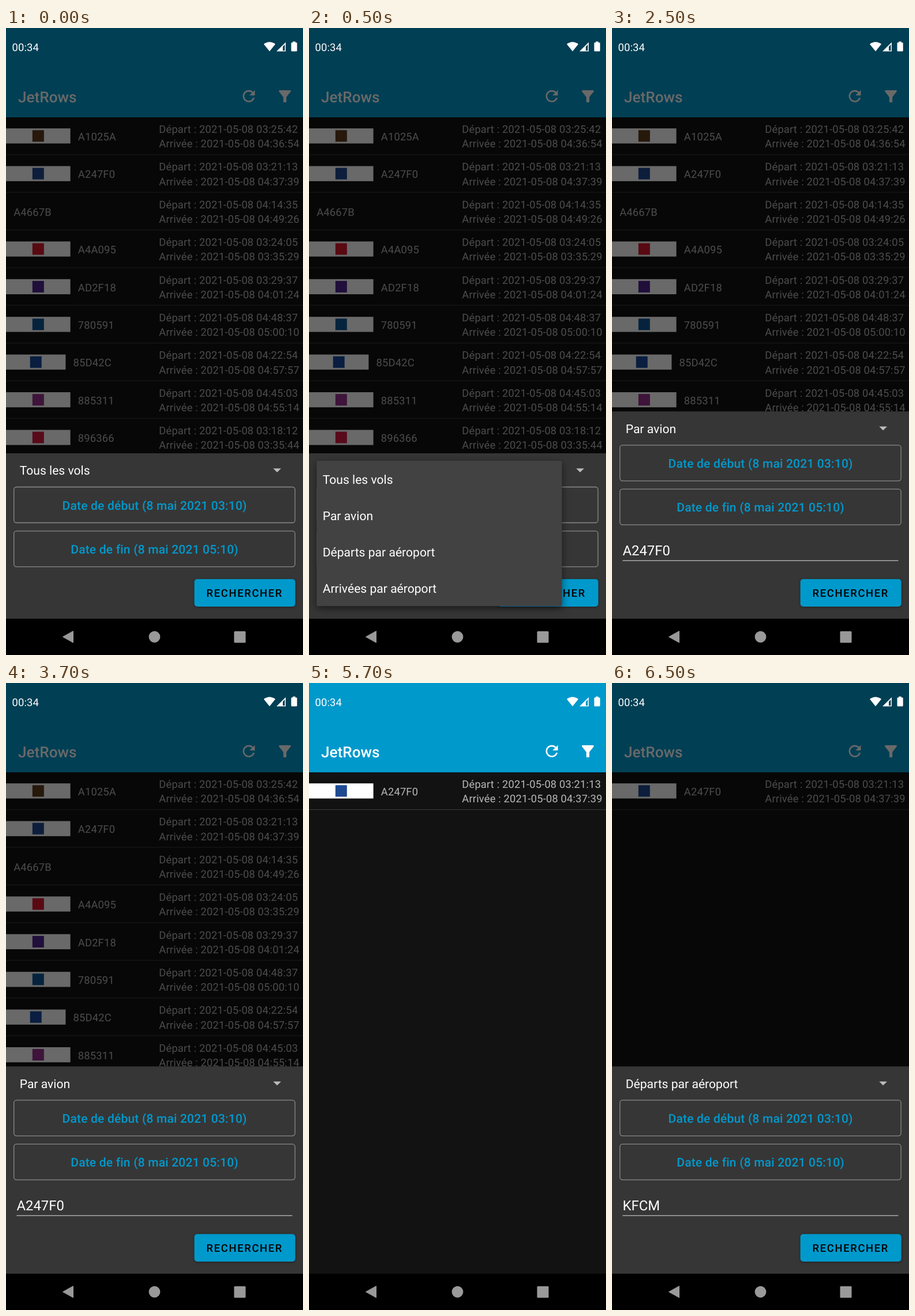
Write an HTML page that moves like this. It is 515 by 1088 pixels and loops after 8000 ms.

```html
<!DOCTYPE html>
<html lang="fr">
<head>
<meta charset="utf-8">
<title>Liste des vols</title>
<style>
html, body { margin: 0; width: 100%; height: 100%; overflow: hidden; background: #000; }
svg { display: block; width: 515px; height: 1088px; }
text { font: 18.36px Roboto, sans-serif; fill: #fff; text-rendering: geometricPrecision; white-space: pre; }
.row text { fill: #b8b8b8; letter-spacing: .16px; }
.clock { letter-spacing: .2px; }
.title { font-size: 26.2px; font-weight: 500; }
.item { font-size: 21.1px; }
.date { font-size: 20.98px; font-weight: 500; letter-spacing: .2px; fill: #0099cc; text-anchor: middle; }
.input { font-size: 23.85px; }
.search { font-weight: 500; letter-spacing: 1.68px; fill: #000; }
.box { fill: none; stroke: #8a8a8a; stroke-width: 1.3; }
</style>
</head>
<body>
<svg id="stage" viewBox="0 0 515 1088"></svg>
<script>
const stage = document.getElementById('stage');

// code, departure, arrival, badge colour, plate width
const flights = [
  ['A1025A', '03:25:42', '04:36:54', '#5d3b1c', 111.6],
  ['A247F0', '03:21:13', '04:37:39', '#1f4a92', 111.6],
  ['A4667B', '04:14:35', '04:49:26', '', 0],
  ['A4A095', '03:24:05', '03:35:29', '#d8162c', 111.6],
  ['AD2F18', '03:29:37', '04:01:24', '#4d2290', 111.6],
  ['780591', '04:48:37', '05:00:10', '#0d5694', 111.6],
  ['85D42C', '04:22:54', '04:57:57', '#17489c', 103.4],
  ['885311', '04:45:03', '04:55:14', '#96308e', 111.6],
  ['896366', '03:18:12', '03:35:44', '#d8183f', 111.6]
];
const choices = ['Tous les vols', 'Par avion', 'Départs par aéroport', 'Arrivées par aéroport'];

const text = (x, y, str, cls = '') => `<text x="${x}" y="${y}" class="${cls}">${str}</text>`;
const rect = (x, y, w, h, fill, more = '') =>
  `<rect x="${x}" y="${y}" width="${w}" height="${h}" fill="${fill}" ${more}/>`;
const path = (d, fill, more = '') => `<path d="${d}" fill="${fill}" ${more}/>`;
const icon = (x, y, d) => path(d, '#fff', `transform="translate(${x} ${y}) scale(1.311)"`);

function row([code, from, to, color, width], i) {
  const plate = width
    ? rect(0, 174.2, width, 26.2, '#fff') + rect(width / 2 - 10, 177.3, 20, 20, color) : '';
  return `<g class="row" transform="translate(0 ${i * 65.4})">${plate}
    ${text(width + 13.2, 195, code)}
    ${text(265.3, 182, `Départ : 2021-05-08 ${from}`)}
    ${text(265.3, 207.3, `Arrivée : 2021-05-08 ${to}`)}
    ${rect(0, 219, 515, 1.3, '#343434')}</g>`;
}

const header = rect(0, 0, 515, 155, '#0099cc') + text(21, 129, 'JetRows', 'title')
  + icon(405.3, 102.6, 'M17.65 6.35C16.2 4.9 14.21 4 12 4c-4.42 0-7.99 3.58-7.99 8s3.57 8 7.99 8c3.73 0 6.84-2.55 7.73-6h-2.08c-.82 2.33-3.04 4-5.65 4-3.31 0-6-2.69-6-6s2.69-6 6-6c1.66 0 3.14.69 4.22 1.78L13 11h7V4z')
  + icon(467.8, 102.8, 'M4.25 5.61C6.27 8.2 10 13 10 13v6c0 .55.45 1 1 1h2c.55 0 1-.45 1-1v-6s3.72-4.8 5.74-7.39C20.25 4.95 19.78 4 18.95 4H5.04c-.83 0-1.3.95-.79 1.61z');

const statusBar = text(10.4, 39.5, '00:34', 'clock')
  + path('M447 28Q457 20.5 467 28L457 40.4z', '#fff')
  + path('M469 40.6L485 24.8V40.6z M480 32.2V39.3H483.5V28.7z', '#fff', 'fill-rule="evenodd"')
  + path('M497.2 25.2V23.6H501.8V25.2H503.4Q504.7 25.2 504.7 26.5V39.3Q504.7 40.6 503.4 40.6H495.8Q494.5 40.6 494.5 39.3V26.5Q494.5 25.2 495.8 25.2z', '#fff');

const navBar = rect(0, 1025, 515, 63, '#000')
  + path('M98.5 1056.5L116.5 1046.5V1066.5z', '#999', 'stroke="#999" stroke-linejoin="round"')
  + '<circle cx="257.5" cy="1056.5" r="9.9" fill="#999"/>'
  + rect(395.5, 1046.7, 20, 20, '#999', 'rx="1.5"');

function sheet(choice, input) {
  const top = input ? 665.3 : 738;
  const field = input
    ? text(18.5, 914.6, input, 'input') + rect(18.4, 923.6, 478, 1.3, '#bcbcbc') : '';
  const dateBox = (y, str) => rect(13.7, y, 487.4, 62, 'none', 'class="box" rx="4.5"')
    + text(257.6, y + 39.3, str, 'date');
  return rect(0, 0, 515, 1025, '#000', 'opacity=".59"')
    + rect(0, top, 515, 1025 - top, '#363636')
    + `<g transform="translate(0 ${top})">
      ${text(23.7, 37.3, choices[choice], 'item')}
      ${path('M463.3 26.3H477L470.1 33z', '#bcbcbc')}
      ${dateBox(58.5, 'Date de début (8 mai 2021 03:10)')}
      ${dateBox(134.8, 'Date de fin (8 mai 2021 05:10)')}</g>`
    + field
    + rect(326.6, 956.2, 175, 47.7, '#0099cc', 'rx="5" style="filter:drop-shadow(0 1px 2px #0006)"')
    + text(347.6, 987.3, 'RECHERCHER', 'search');
}

const menu = () => rect(13.2, 751, 425.3, 252, '#424242', 'rx="2.6" style="filter:drop-shadow(0 4px 7px #0008)"')
  + choices.map((str, i) => text(23.7, 791 + i * 63, str, 'item')).join('');

const screen = (list, overlay = '') => rect(0, 0, 515, 1088, '#121212')
  + list.map(row).join('') + header + overlay + statusBar + navBar;

const found = [flights[1]];
const scenes = [
  [0, screen(flights, sheet(0))],
  [500, screen(flights, sheet(0) + menu())],
  [2500, screen(flights, sheet(1, 'A247F0'))],
  [4500, screen(found)],
  [6500, screen(found, sheet(2, 'KFCM'))]
];

let shown;
function draw() {
  const t = performance.now() % 8000;
  const scene = scenes.findLast(([start]) => t >= start);
  if (scene !== shown) stage.innerHTML = (shown = scene)[1];
  requestAnimationFrame(draw);
}
draw();
</script>
</body>
</html>
```
